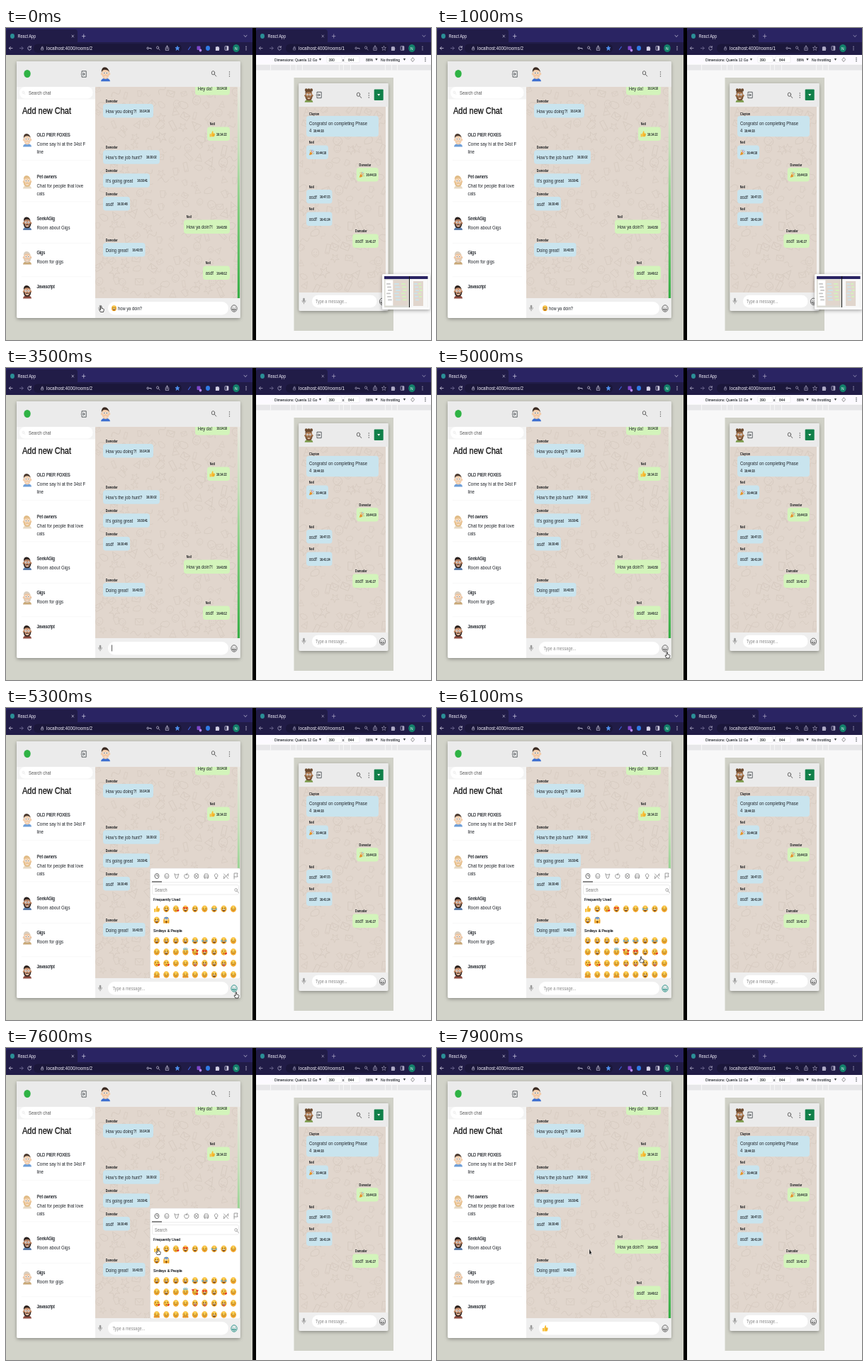
Animation, 600 px wide and 440 px high, one loop 8000 ms. Source, as an HTML page:

```html
<!DOCTYPE html>
<html lang="en">
<head>
<meta charset="utf-8">
<title>Chat rooms</title>
<style>
html, body { margin: 0; width: 100%; height: 100%; overflow: hidden; background: #000; }
svg { display: block; width: 600px; height: 440px; font-family: "Liberation Sans", Arial, sans-serif; }
text { white-space: pre; }
</style>
</head>
<body>
<svg id="stage" viewBox="0 0 600 440"></svg>
<script>
const LOOP = 8000, STEP = 100;
const SQUEEZE = 0.84;
const INK = '#20242a', BLUE = '#c9e4ee', GREEN = '#d3f4bb', BAR = '#ebebeb';
const STRIP = '#2a2463', TOOLBAR = '#211c47';

let seed = 77;
const rnd = () => (seed = seed * 16807 % 2147483647) / 2147483647;

const rect = (x, y, w, h, fill, r = 0, more = '') =>
  `<rect x="${x}" y="${y}" width="${w}" height="${h}" rx="${r}" fill="${fill}" ${more}/>`;
const oval = (x, y, rx, ry, fill, more = '') =>
  `<ellipse cx="${x}" cy="${y}" rx="${rx}" ry="${ry}" fill="${fill}" ${more}/>`;
const fillPath = (d, fill) => `<path d="${d}" fill="${fill}"/>`;
const line = (d, color, w = 1) =>
  `<path d="${d}" fill="none" stroke="${color}" stroke-width="${w}" stroke-linecap="round" stroke-linejoin="round"/>`;
const at = (x, y, body, k = 1) => `<g transform="translate(${x} ${y}) scale(${k})">${body}</g>`;
const text = (x, y, size, str, fill = INK, more = '') =>
  `<text transform="translate(${x} ${y}) scale(${SQUEEZE} 1)" font-size="${size}" fill="${fill}" ${more}>${str}</text>`;
const BOLD = 'font-weight="700"';
const MEDIUM = `stroke="${INK}" stroke-width=".2"`;

// Icons, each centred on its point
const search = (x, y, c = '#555', k = 1) => at(x, y, line('M1 1L3.2 3.6M1.2-1.2A2.2 2.6 0 1 1-3.2-1.2A2.2 2.6 0 1 1 1.2-1.2', c, .9), k);
const dots = (x, y, c = '#555', gap = 3) => [-gap, 0, gap].map(d => oval(x, y + d, .7, .8, c)).join('');
const leave = (x, y) => at(x, y, line('M-3-1.5V-4.2H3.2V4.2H-3V1.5M-4 0H1M-.6-1.8L1 0L-.6 1.8', '#4d5357', .9));
const mic = (x, y) => at(x, y,
  rect(-1.3, -4.2, 2.6, 5.4, '#999', 1.3) + line('M-2.6-.6Q-2.6 2.4 0 2.4T2.6-.6M0 2.4V4', '#999', .7));
const smiley = (x, y, id = '') => `<g ${id} stroke="#555" fill="none" stroke-width=".9" transform="translate(${x} ${y})">
  <ellipse rx="4.1" ry="4.7"/><path d="M-2.3 1H2.3Q2 3 0 3T-2.3 1ZM-1.5-1.4V-1.2M1.5-1.4V-1.2" stroke-linecap="round"/></g>`;

function face(x, y, skin, hair, shirt, beard = false, k = 1) {
  return at(x, y,
    fillPath('M-6 10Q-5.6 5.8 0 5.8T6 10Z', shirt) +
    oval(-5, .2, 1.3, 1.6, skin) + oval(5, .2, 1.3, 1.6, skin) + oval(0, 0, 4.9, 7, skin) +
    (beard ? line('M-4.4 1.6Q-4 6.6 0 6.6T4.4 1.6', hair, 1.5) + line('M-1.7 2.9Q0 1.9 1.7 2.9', hair, .9) : '') +
    fillPath('M-5.2-1.6Q-5.6-8.6-1-8.6T5.2-1.6Q4.2-5 0-5.2T-5.2-1.6Z', hair) +
    oval(-1.9, -1, 1.4, 1.5, '#fff') + oval(1.9, -1, 1.4, 1.5, '#fff') +
    oval(-1.8, -.9, .6, .7, '#222') + oval(1.8, -.9, .6, .7, '#222') +
    fillPath('M-1.8 3.6H1.8Q1.4 5 0 5T-1.8 3.6Z', '#f3e2da'), k);
}

const HEART = 'M0 1.6Q-2.4-.2-1.3-1.3Q-.4-1.8 0-.7Q.4-1.8 1.3-1.3Q2.4-.2 0 1.6Z';
const OPEN = 'M-2.3.5H2.3Q2.1 3.4 0 3.4T-2.3.5Z';
const THUMB = 'M-1.2-.4L.4-4.6Q2.1-4.7 1.6-1.1H3.6Q4.6-.6 4.1 1L3.2 4.3H-1.2ZM-3.7-.3H-1.7V4.5H-3.7Z';

// g grin, s smile, t tears, h heart eyes, k kiss, a halo, o shock, p hearts, z tongue, w hands, u thumb, c confetti
function emoji(x, y, kind, k = 1) {
  if (kind === 'u') return at(x, y, fillPath(THUMB, '#f9bd32') + line('M1.8.6H4M1.6 2.4H3.6', '#d98d1c', .5), k);
  if (kind === 'c') return at(x, y,
    fillPath('M-3.4 4.4L-1.4-1.8L2.2 2.2Z', '#f0a12c') + line('M-2.4 2.4L-.8 3.4M-1.8.2L.8 2.8', '#c8641d', .6) +
    line('M.6-.6Q1-3 0-4M1.6.4Q3.4-.6 3.6-2', '#d94f43', .7) +
    oval(2.2, -3.6, .6, .7, '#4b8fe0') + oval(3.7, 1.8, .6, .7, '#67b04a') + oval(-2, -3, .6, .7, '#e4b52f'), k);
  const dark = '#6b3c12';
  const eyes = (rx, ry) => oval(-1.5, -1.1, rx, ry, dark) + oval(1.5, -1.1, rx, ry, dark);
  const bent = line('M-2.4-.7Q-1.5-2-.7-.7M.7-.7Q1.5-2 2.4-.7', dark, .6);
  const grin = fillPath(OPEN, dark) + rect(-1.8, .6, 3.6, .9, '#fff');
  const arc = line('M-2 1.1Q0 3.2 2 1.1', dark, .6);
  const parts = {
    g: () => eyes(.6, .9) + grin,
    s: () => bent + arc,
    t: () => bent + grin + oval(-3.2, .4, .9, 1.4, '#5cb8ec') + oval(3.2, .4, .9, 1.4, '#5cb8ec'),
    h: () => at(-1.7, -1.2, fillPath(HEART, '#e0322b')) + at(1.7, -1.2, fillPath(HEART, '#e0322b')) + grin,
    k: () => eyes(.6, .8) + oval(0, 1.8, .7, .8, dark) + at(3, 2.4, fillPath(HEART, '#e0322b')),
    a: () => bent + arc + oval(0, -4.2, 3.2, 1, 'none', 'stroke="#58b4e6" stroke-width=".9"'),
    o: () => oval(0, -3, 3, 1.5, '#5f8fd0') + oval(-1.4, -.9, 1, 1.2, '#fff') + oval(1.4, -.9, 1, 1.2, '#fff') +
      oval(-1.4, -.9, .4, .5, dark) + oval(1.4, -.9, .4, .5, dark) + oval(0, 2.2, 1, 1.6, dark) +
      oval(-3.2, 2.4, 1, 2.2, '#f0a930') + oval(3.2, 2.4, 1, 2.2, '#f0a930'),
    p: () => bent + arc + [[-3, -2.6], [3.2, -1.6], [2.8, 3]].map(q => at(...q, fillPath(HEART, '#e0322b'))).join(''),
    z: () => eyes(.7, 1) + grin + oval(.3, 3.1, 1.1, 1.3, '#e8566a'),
    w: () => bent + arc + oval(-2.6, 3.3, 1.6, 1.3, '#e8912a') + oval(2.6, 3.3, 1.6, 1.3, '#e8912a')
  };
  return at(x, y, oval(0, 0, 4.1, 4.7, 'url(#skin)') + parts[kind](), k);
}

// Browser frame: tab strip plus toolbar
function browser(x, w, url, urlX, c, icons) {
  const r = x + w;
  const [key, find, share, star, puzzle, side, user, menu] = icons;
  return rect(x, 0, w, 38, STRIP) + rect(x, 2, 101, 20, TOOLBAR, 4) + rect(x, 20, w, 18, TOOLBAR) +
    rect(urlX - 18, 22.5, star + 24 - urlX, 12.5, '#1b173a', 6) +
    oval(x + 9, 11.5, 3, 3.4, '#2b8f96') + text(x + 16.5, 14, 6.6, 'React App', '#f0eefa') +
    line(`M${x + 93} 10l2.6 3m0-3l-2.6 3M${x + 107.5} 11.5h4.4m-2.2-2.6v5.2M${r - 12} 10.2l2 2.4l2-2.4`, c, .7) +
    line(`M${x + 9} 28.5h-4.6m2-2.2l-2 2.2l2 2.2`, c, .8) +
    line(`M${x + 19.5} 28.5h4.6m-2-2.2l2 2.2l-2 2.2`, '#77719a', .8) +
    line(`M${x + 35.2} 27.2a2.3 2.7 0 1 0 .2 2.1m-.1-3.7v1.7h-1.7`, c, .8) +
    line(`M${urlX - 7} 28.3h2.6v2.6h-2.6zm.5 0v-1.2a.8 .9 0 0 1 1.6 0v1.2`, c, .6) +
    text(urlX, 31, 7.5, url, '#f4f2fc') +
    oval(key - 1.8, 28.5, 1.2, 1.4, 'none', `stroke="${c}" stroke-width=".8"`) + line(`M${key} 28.5h3v1.3`, c, .8) +
    search(find + .8, 28.5, c, .7) +
    line(`M${share - 1.3} 27.8h-.9v3.6h4.4v-3.6h-.9M${share} 29.6v-4.6m-1.2 1.4l1.2-1.4l1.2 1.4`, c, .7) +
    at(star, 28.5, `<path d="M0-3.8L1-1.1H3.6L1.6.7L2.3 3.6L0 1.9L-2.3 3.6L-1.6.7L-3.6-1.1H-1Z" stroke="${x ? c : '#4f93f5'}" stroke-width=".7" fill="${x ? 'none' : '#4f93f5'}"/>`, .85) +
    fillPath(`M${puzzle - 2.6} 26.5h1.6a1 1.4 0 0 1 1.8 0h1.6v1.8a1 1.2 0 0 1 0 2v1.7h-5z`, c) +
    rect(side - 2.4, 25.7, 4.8, 5.6, 'none', .5, `stroke="${c}" stroke-width=".8"`) + rect(side, 25.7, 2.4, 5.6, c) +
    oval(user, 28.5, 4.7, 5.5, '#12806a') + text(user - 1.9, 30.8, 6, 'N', '#fff') + dots(menu, 28.5, c, 2.2);
}

function doodles(x, y, w, h, n) {
  const shapes = ['M-4 0A4 4.6 0 1 1 4 0A4 4.6 0 1 1-4 0M-1.5-1V0M1.5-1V0M-2 2Q0 3.5 2 2', 'M-4-3H4V3H-4ZM-4-3L0 1L4-3',
    'M-5 2Q-3-4 0 0T5-2', 'M0-5L1.4-1.5H5L2 1L3 5L0 2.6L-3 5L-2 1L-5-1.5H-1.4Z', 'M-3-4H3L2 4H-2ZM3-2Q6-2 3 2',
    'M-4 4L0-5L4 4ZM-2 0H2', 'M-5 0Q-3-4 0-3Q4-4 5 0Q3 4 0 3T-5 0', 'M-2-5H2V5H-2ZM-1 3.6H1'];
  const cols = Math.round(Math.sqrt(n * w / h)), rows = Math.ceil(n / cols);
  let out = '';
  for (let i = 0; i < cols * rows; i++) {
    const px = x + (i % cols + .2 + rnd() * .6) * w / cols, py = y + (Math.floor(i / cols) + .2 + rnd() * .6) * h / rows;
    out += `<path d="${shapes[Math.floor(rnd() * shapes.length)]}" transform="translate(${px.toFixed(1)} ${py.toFixed(1)}) rotate(${Math.round(rnd() * 90 - 45)}) scale(${(.9 + rnd() * .6).toFixed(2)})"/>`;
  }
  return `<g fill="none" stroke="#cbbfb4" stroke-width=".6" opacity=".5">${out}</g>`;
}

const stamp = (x, y, time) => text(x, y, 4.5, time, '#24292d', 'stroke="#24292d" stroke-width=".15"');

// body is text, or an emoji kind when prefixed with ":"
function bubble(x, y, w, who, body, time, timeX, mine) {
  const inner = body[0] === ':' ? emoji(x + 7, y + 10, body[1], .9) : text(x + 3.8, y + 12.6, 7, body);
  return rect(x, y, w, 19.4, mine ? GREEN : BLUE, 4) +
    text(x + 3.8, y - 2.2, 4.6, who, '#15181b', BOLD) + inner + stamp(timeX, y + 12, time);
}

function room(y, title, lines, skin, hair, shirt, beard) {
  return face(30, y + 4.5, skin, hair, shirt, beard) +
    text(43.5, y, 7, title, INK, MEDIUM + ' letter-spacing="-.15"') +
    lines.map((s, i) => text(43.5, y + 13.3 + i * 10.6, 7.2, s)).join('');
}

function leftPage() {
  const a = 'Damodar', b = 'Neil';
  return rect(0, 38, 348, 402, '#d2d3c9') +
    `<g filter="url(#shade)">${rect(15, 47, 315.5, 362, '#fff', 2)}</g>` +
    rect(15, 47, 111, 36, '#ebebeb') + oval(30, 64.5, 4.7, 5.5, '#2fb344') + leave(110, 65) +
    rect(15, 83, 111, 17.5, '#f4f4f4') + rect(19, 83, 103.5, 16.5, '#fff', 8) +
    text(32, 93.8, 7, 'Search chat', '#555') + search(25, 91.5, '#ddd', .6) +
    text(23, 121.3, 13.1, 'Add new Chat', '#111', 'stroke="#111" stroke-width=".3"') +
    [186, 244.5, 303, 350.5].map(y => rect(22, y, 98, .7, '#f5f5f5')).join('') +
    room(153, 'OLD PIER FOXES', ['Come say hi at the 34st F', 'line'], '#f3cfae', '#4a3a30', '#6f9fd8') +
    room(212, 'Pet owners', ['Chat for people that love', 'cats'], '#f0cda6', '#e0bb84', '#e6d9c4', true) +
    room(270.5, 'SeekAGig', ['Room about Gigs'], '#b98262', '#2a2220', '#5a7ba8', true) +
    room(319, 'Gigs', ['Room for gigs'], '#f0c8a6', '#d9cdbd', '#c9a878', true) +
    room(367, 'Javascript', [], '#c99270', '#2a201c', '#8c4b40', true) +
    rect(126, 83, 204.5, 298, '#e1d6cd') +
    `<g clip-path="url(#chatL)">${doodles(126, 83, 204, 298, 220)}` +
    bubble(267, 75, 49, b, 'Hey da!', '16:14:10', 297.5, true) +
    bubble(137, 107, 71, a, 'How you doing?!', '16:14:16', 188.5) +
    bubble(284, 139.5, 32, b, ':u', '16:14:22', 297, true) +
    bubble(137, 172.3, 80, a, 'How\'s the job hunt?', '16:30:02', 198) +
    bubble(137, 205.3, 66, a, 'It\'s going great', '16:30:41', 185.3) +
    bubble(137, 238, 38, a, 'asdf', '16:30:48', 157) +
    bubble(251, 270.5, 65, b, 'How ya doin?!', '16:43:50', 297.3, true) +
    bubble(137, 303, 59.5, a, 'Doing great!', '16:43:55', 178.5) +
    bubble(278, 335.5, 38, b, 'asdf', '16:49:12', 297.3, true) +
    rect(326.8, 83, 3.4, 298, 'url(#strip)') + '</g>' +
    rect(126, 47, 204.5, 36, BAR) + face(140.5, 64.5, '#f2cbaa', '#3a2a22', '#3d6fd0', false, 1.08) +
    search(293.5, 64.5) + dots(315.5, 65) +
    rect(126, 381, 204.5, 28, '#efefef') + rect(144, 386, 170, 18.5, '#fff', 9) +
    mic(133, 395) + smiley(322, 395.5, 'id="smile"');
}

function rightPage() {
  const a = 'Damodar', b = 'Neil', grey = '#3c4043', rule = '#e7e7e9';
  const box = x => rect(x, 40, 21, 8.8, '#fff', 1, 'stroke="#e2e2e6" stroke-width=".6"');
  const label = (x, str) => text(x, 46.7, 6, str, grey, `stroke="${grey}" stroke-width=".15"`);
  return rect(353, 38, 247, 402, '#f8f8f8') + rect(353, 38, 247, 13, '#fcfaff') +
    label(379, 'Dimensions: Quenla 12 Go') + box(453) + box(478) +
    label(455.5, '390') + label(474.8, 'x') + label(483, '844') + label(508, '86%') + label(529, 'No throttling') +
    [443.5, 523, 562.5].map(x => fillPath(`M${x - 1.6} 43h3.2l-1.6 3z`, grey)).join('') +
    line('M572 44.5l2.3-2.8l2.3 2.8l-2.3 2.8z', '#777', .8) + dots(592, 44.5, grey, 2.2) +
    rect(353, 52, 247, 7.5, rule) +
    [373, 401, 409, 418, 470, 476, 486, 535, 544, 552].map(x => rect(x, 52, .8, 7.5, '#fafafa')).join('') +
    rect(406.5, 70, 140.5, 357, '#d0d1c7') +
    `<g filter="url(#shade)">${rect(413.5, 78, 126, 321, '#efefef', 2)}</g>` +
    rect(413.5, 111, 126, 262, '#e1d6cd') +
    `<g clip-path="url(#chatR)">${doodles(413, 111, 124, 262, 120)}</g>` + rect(536, 83, 3.2, 290, '#f4f4f2') +
    rect(424, 124, 102, 29.2, BLUE, 4) +
    text(428, 122.5, 4.6, 'Clayton', '#15181b', BOLD) +
    text(428, 136.5, 7, 'Congrats! on completing Phase') + text(428, 147.3, 7, '4') +
    stamp(434, 147, '16:44:18') +
    bubble(424, 165.6, 31, b, ':c', '16:44:18', 437.5) +
    bubble(494.8, 197, 31, a, ':c', '16:44:19', 508.3, true) +
    bubble(424, 228, 36.5, b, 'asdf', '16:47:15', 443) +
    bubble(424, 259.6, 36.5, b, 'asdf', '16:41:24', 443) +
    bubble(489.3, 290.6, 36.5, a, 'asdf', '16:41:27', 507.5, true) +
    rect(413.5, 78, 126, 33, BAR) +
    [-3.6, 0, 3.6].map(d => oval(427.5 + d, 87.5, 2, 2.2, '#6b4a30')).join('') +
    face(427.5, 95, '#a5734c', '#6b4a30', '#7d9a4c', true, .98) +
    leave(442, 94.5) + search(498.5, 95) + dots(512.3, 95) +
    rect(519.7, 86.5, 13, 15.5, '#11804a', 1) + fillPath('M524.2 93h4l-2 2.8z', '#fff') +
    rect(432, 376.8, 91.5, 17.4, '#fff', 8.5) + mic(420.5, 385) + smiley(531.5, 385.8) +
    text(437, 388, 6.5, 'Type a message...', '#8a8a8a');
}

function picker() {
  const tabs = ['M-3 0A3 3.6 0 1 1 3 0A3 3.6 0 1 1-3 0M0-2V0H1.5', 'M-3 0A3 3.6 0 1 1 3 0A3 3.6 0 1 1-3 0M-1.5 1Q0 2.6 1.5 1M-1-1V-.8M1-1V-.8',
    'M-3-3L-2 0Q-2 3.5 0 3.5T2 0L3-3L1-2H-1Z', 'M0-2Q-4-3-3 1Q-1 5 0 3Q1 5 3 1Q4-3 0-2ZM0-2L1-4', 'M-3 0A3 3.6 0 1 1 3 0A3 3.6 0 1 1-3 0M-2-2L2 2M2-2L-2 2',
    'M-3 2V0L-2-3H2L3 0V2ZM-3 0H3M-2 2V3.5M2 2V3.5', 'M-1 2Q-3 0-2-2Q0-5 2-2Q3 0 1 2ZM-1 3.5H1', 'M-3-3L3 3.5M3-3L-3 3.5M-3 0V3.5M3-3V0', 'M-2.5 4V-4H2.5L1.5-1.5L2.5 1H-2.5'];
  const row = (s, y) => [...s].map((k, i) => emoji(212.8 + i * 13.52, y, k)).join('');
  return rect(203.5, 226, 127, 156, '#fff', 2, 'stroke="#d9d9d9" stroke-width=".6"') +
    tabs.map((d, i) => at(213 + i * 13.95, 237, line(d, i ? '#858585' : '#555', .8))).join('') +
    rect(203.5, 245.6, 127, .6, '#ddd') + rect(206, 244.3, 14, 1.5, '#666') +
    rect(206.5, 249.5, 122, 13.5, '#fff', 2, 'stroke="#dedede" stroke-width=".6"') +
    text(210, 259, 6.6, 'Search', '#777') + search(325.5, 257.5, '#888', .8) +
    text(208, 271.7, 6.2, 'Frequently Used', INK, MEDIUM) + row('ugkhgstgs', 283.3) + row('go', 299.3) +
    text(208, 316.3, 6.2, 'Smileys &amp; People', INK, MEDIUM) +
    row('ggggttgts', 328) + row('sgsaphgks', 344) + row('kksszzgzs', 360) + row('wsswssgss', 376);
}

// Floating screen capture preview
function preview() {
  const rows = (x, w, n, c) => Array.from({ length: n }, (_, i) => rect(x + i % 3, 360 + i * 4.5, w, 1.8, c, 1)).join('');
  return `<g filter="url(#shade)">${rect(531, 347, 67.5, 50, '#fbfbfb', 2)}</g>` +
    rect(534, 350, 61.5, 44, '#dcdcd5') + rect(534, 350, 61.5, 4, STRIP) + rect(569, 350, 1, 44, '#111') +
    rect(570, 354, 25.5, 40, '#f8f8f8') + rect(535.5, 355.5, 11, 36, '#fff') + rect(546.5, 355.5, 21, 36, '#e1d6cd') +
    rows(537, 6, 6, '#c4c4c4') + rows(548, 7, 6, BLUE) + rows(558, 6, 6, GREEN) +
    rect(575, 357, 14, 35, '#e1d6cd') + rows(576, 5, 6, BLUE) + rows(582, 4, 5, GREEN);
}

const stage = document.getElementById('stage');
stage.innerHTML = `<defs>
  <radialGradient id="skin" cy=".35"><stop offset=".2" stop-color="#ffdc5c"/><stop offset="1" stop-color="#f2a427"/></radialGradient>
  <linearGradient id="strip" x2="0" y2="1"><stop offset="0" stop-color="#ebe8e0"/><stop offset=".3" stop-color="#c4dfba"/><stop offset=".6" stop-color="#7ccb7b"/><stop offset="1" stop-color="#35ad45"/></linearGradient>
  <filter id="shade" x="-10%" y="-10%" width="120%" height="125%"><feDropShadow dx="0" dy="1.5" stdDeviation="2.5" flood-opacity=".35"/></filter>
  <clipPath id="chatL"><rect x="126" y="83" width="204.5" height="298"/></clipPath>
  <clipPath id="chatR"><rect x="413.5" y="111" width="122.5" height="262"/></clipPath>
  <clipPath id="pick"><rect x="203" y="225.5" width="128" height="156.5"/></clipPath></defs>` +
  rect(0, 0, 600, 440, '#000') +
  leftPage() + browser(0, 348, 'localhost:4000/rooms/2', 57, '#d0cde2', [202, 214, 227.5, 242, 298.5, 311.5, 325, 339]) +
  line('M257.5 30.5l2.8-4', '#3c5fd8', 1.2) + rect(269.5, 25.5, 5, 5.5, '#7d45c9', 1) + oval(274.5, 31.5, 1.8, 2, '#b48af0') +
  oval(285, 28.5, 3, 3.4, '#2f7be6') +
  rightPage() + browser(353, 247, 'localhost:4000/rooms/1', 413, '#aeaac6', [496, 508, 521, 533.5, 546.5, 559.5, 573, 588]) +
  `${text(158, 397.8, 6.9, '', INK, 'id="typed"')}
  <g id="grin">${emoji(152.5, 395.3, 'g', .85)}</g><g id="thumb">${emoji(152.5, 395.3, 'u', .95)}</g>
  ${text(150.5, 397.8, 6.7, 'Type a message...', '#8a8a8a', 'id="hint"')}
  ${rect(149.2, 390.5, .8, 9, '#333', 0, 'id="caret"')}
  <g id="picker" clip-path="url(#pick)">${picker()}</g>
  <g id="preview">${preview()}</g>
  <g id="hand"><path d="M-1.6 4.5L-3.4 1.4Q-3.2.2-2.2.8L-1.4 1.6V-3.6Q-.7-4.6 0-3.6V-.7L2.7.1Q3.6.4 3.2 1.8L2.5 4.5Z" fill="#fff" stroke="#222" stroke-width=".8"/></g>
  <g id="beam">${line('M-1.2-4H1.2M0-4V4M-1.2 4H1.2', '#333', .8)}</g>
  <g id="arrow"><path d="M0-4V4.2L1.3 2.9L2.2 4.8L3.1 4.3L2.2 2.5H3.6Z" fill="#111" stroke="#fff" stroke-width=".4"/></g>`;

const $ = id => document.getElementById(id);
const show = (id, on) => { $(id).style.display = on ? '' : 'none'; };

// [time, characters of the message still in the field]
const DRAFT = 'how ya doin?';
const deletes = [[0, 12], [1800, 11], [2000, 10], [2200, 9], [2300, 8], [2400, 7], [2500, 6], [3000, 4], [3200, 2], [3300, 1], [3400, 0]];
// [time, x, y]
const track = [[0, 135, 396], [500, 135, 396], [4500, 153, 395], [4800, 280, 399], [5000, 325.5, 404.5], [5400, 325.5, 404.5],
  [5700, 318, 384], [6000, 300, 352], [6400, 255, 362], [6700, 234, 352], [7000, 225, 337.5], [7300, 217, 312], [7600, 215, 287], [LOOP, 215, 287]];

function pointer(t) {
  const i = track.findIndex(p => p[0] > t);
  const [t0, x0, y0] = track[i - 1], [t1, x1, y1] = track[i];
  const k = (t - t0) / (t1 - t0);
  return `translate(${x0 + (x1 - x0) * k} ${y0 + (y1 - y0) * k})`;
}

function draw(now) {
  const t = Math.floor(now % LOOP / STEP) * STEP;
  const within = (a, b) => t >= a && t < b;
  const open = within(5200, 7800);

  $('typed').textContent = DRAFT.slice(0, deletes.filter(d => d[0] <= t).pop()[1]);
  show('grin', t < 3500);
  show('hint', within(3800, 7800));
  show('thumb', t >= 7800);
  show('caret', within(3500, 4000) || within(4500, 5000));
  show('picker', open);
  $('smile').setAttribute('stroke', open ? '#12877c' : '#555');

  const slide = Math.min(1, Math.max(0, (t - 900) / 600));
  show('preview', slide < 1);
  $('preview').setAttribute('transform', `translate(${75 * slide * slide} 0)`);

  const shape = t < 500 || within(4900, 7800) ? 'hand' : within(4500, 4900) ? 'beam' : t >= 7800 ? 'arrow' : '';
  for (const id of ['hand', 'beam', 'arrow']) show(id, id === shape);
  if (shape) $(shape).setAttribute('transform', pointer(t));
}

const start = performance.now();
function tick() {
  draw(performance.now() - start);
  requestAnimationFrame(tick);
}
tick();
</script>
</body>
</html>
```
